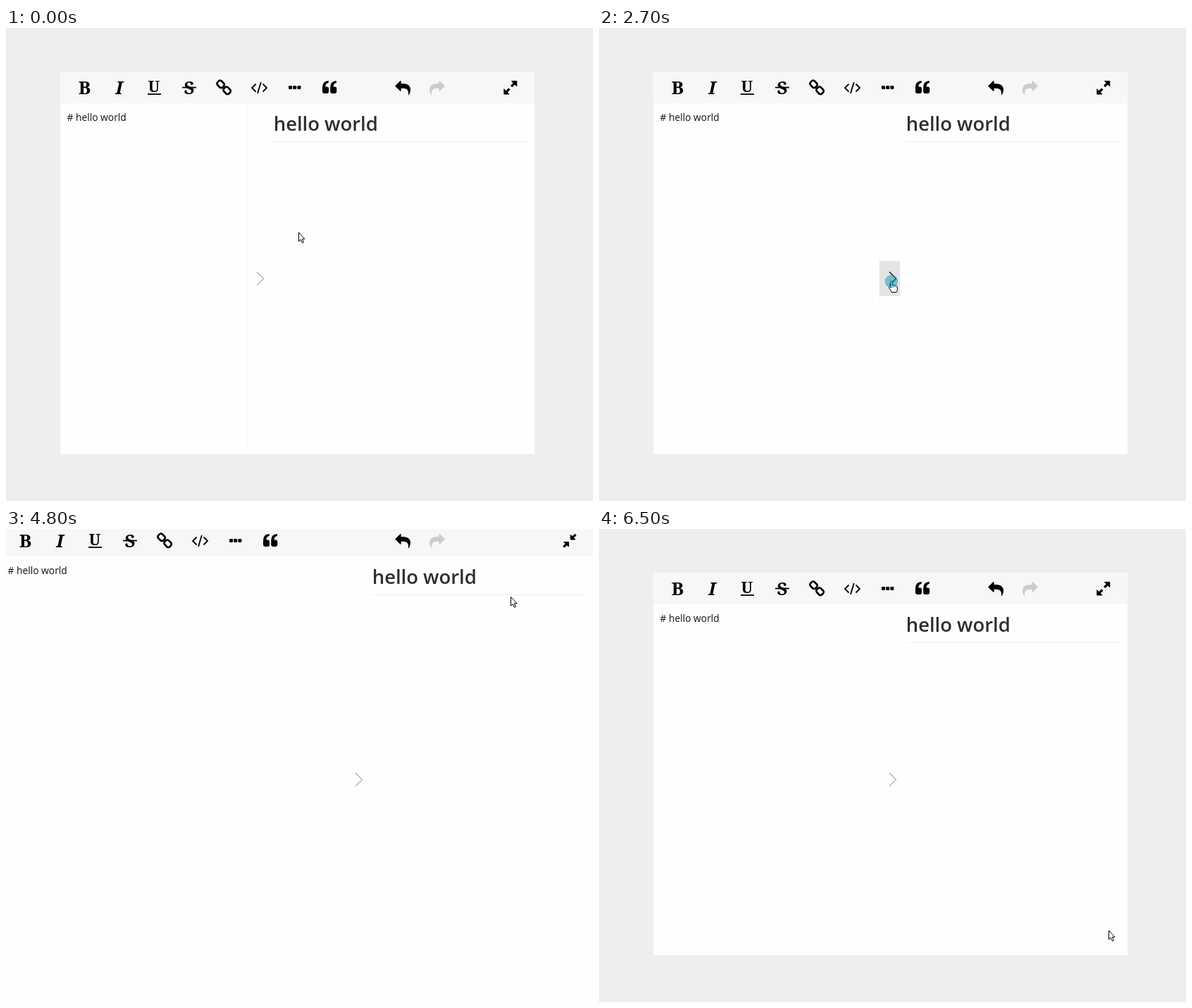
An HTML page for the animation above (7300 ms loop, 833 by 672 pixels).

```html
<!DOCTYPE html>
<html lang="en">
<head>
<meta charset="utf-8">
<title>Markdown editor</title>
<style>
  html, body { margin: 0; width: 100%; height: 100%; overflow: hidden; background: #eee; }
  svg { display: block; }
  text { font-family: "Open Sans", "Noto Sans", sans-serif; }
  .serif { font-family: "Noto Serif", "Liberation Serif", serif; font-weight: 700; text-anchor: middle; }
  .line { fill: none; stroke: #000; }
  .pointer { fill: #fff; stroke: #000; stroke-linejoin: round; }
</style>
</head>
<body>
<svg width="833" height="672" viewBox="0 0 833 672">
  <defs>
    <path id="back" d="M552 82.4L559.3 75.2Q560.6 74.3 560.6 76V79.1H563C571 79.1 574 83 574 88Q574 91 571.8 95Q571 95.6 571 94.5C571.4 88 569 85.8 563 85.8H560.6V88.8Q560.6 90.4 559.3 89.5Z"/>
    <path id="quote" d="M457.6 75V78Q453.4 78.6 453.3 83.6H455.6Q458 83.6 458 86V90.6Q458 93 455.6 93H451.4Q449 93 449 90.6V84Q449 75.4 457.6 75Z"/>
    <rect id="ring" x="-5" y="-4" width="10" height="8" rx="2.8"/>
    <g id="out">
      <path d="M9 -9.3V-2L1.7 -9.3Z" stroke="#000" stroke-linejoin="round"/>
      <path class="line" d="M6 -6.3L1.4 -1.7" stroke-width="3.2"/>
    </g>
    <g id="in">
      <path d="M1.4 -1.7V-8.4L8.1 -1.7Z" stroke="#000" stroke-linejoin="round"/>
      <path class="line" d="M4 -4.3L8.6 -8.9" stroke-width="3.2"/>
    </g>
  </defs>

  <rect id="panel" fill="#fefefe"/>
  <rect id="bar" fill="#f7f7f7"/>
  <rect id="hover" fill="#fefefe"/>

  <g id="left">
    <text class="serif" x="111.5" y="94" font-size="26">B</text>
    <text class="serif" x="160.5" y="94" font-size="26" font-style="italic">I</text>
    <text class="serif" x="210" y="90.5" font-size="22">U</text>
    <path class="line" d="M201 94H220" stroke-width="1.8"/>
    <text class="serif" x="260" y="94" font-size="26">S</text>
    <path class="line" d="M250 84.5H270" stroke-width="1.8"/>
    <g class="line" stroke-width="2.7">
      <use href="#ring" transform="translate(304.6 79.8) rotate(45)"/>
      <use href="#ring" transform="translate(313.6 88.8) rotate(45)"/>
    </g>
    <path class="line" d="M354.5 79.5L349 85L354.5 90.5M364.5 79.5L370 85L364.5 90.5M361.8 77L357 93" stroke-width="1.8"/>
    <rect x="401" y="82" width="5" height="5" rx="1.3"/>
    <rect x="407.2" y="82" width="5" height="5" rx="1.3"/>
    <rect x="413.4" y="82" width="5" height="5" rx="1.3"/>
    <use href="#quote"/>
    <use href="#quote" x="11.2"/>
    <text x="86.5" y="132.3" font-size="13.8" fill="#111">#&#160;hello world</text>
  </g>

  <g id="middle">
    <use href="#back"/>
    <use href="#back" transform="translate(1175) scale(-1 1)" fill="#ccc"/>
  </g>

  <g id="right">
    <g id="expand"><use href="#out"/><use href="#out" transform="rotate(180)"/></g>
    <g id="shrink"><use href="#in"/><use href="#in" transform="rotate(180)"/></g>
  </g>

  <g id="preview">
    <rect id="splitter" width="1" fill="#f8f8f8"/>
    <text id="title" font-size="27.4" font-weight="600" fill="#2d2d2d">hello world</text>
    <rect id="rule" height="1" fill="#eee"/>
  </g>
  <rect id="toggle" y="331" width="29" height="50" fill="#e4e4e4"/>
  <path id="chevron" fill="none" stroke-width="1.4"/>

  <g id="cursor">
    <path id="arrow" class="pointer" d="M.5 .5V13.2L3.3 10.6L5.4 15.4L7.4 14.5L5.4 9.8H9Z"/>
    <path id="hand" class="pointer" d="M-1 .5Q.3 -1.6 1.5 .5V5.5Q3.2 4.6 4 6Q5.8 5.4 6.4 7Q8.4 6.6 8.4 9V11.5Q8 13.5 7 15.5H.3Q-.8 12.6 -3.3 9.6Q-4 7.4 -2.5 7.6L-1 9Z"/>
    <path id="resize" d="M-7 .5L-4 -2.5V0H4V-2.5L7 .5L4 3.5V1H-4V3.5Z"/>
    <circle id="press" r="9.3" fill="#0896af" fill-opacity=".5"/>
  </g>
</svg>
<script>
const LOOP = 7300, STEP = 100;
const $ = id => document.getElementById(id);
const set = (id, attrs) => { for (const k in attrs) $(id).setAttribute(k, attrs[k]); };
const show = (id, on) => set(id, { display: on ? "inline" : "none" });
const move = (id, x, y) => set(id, { transform: `translate(${x} ${y})` });
const box = (id, x, y, width, height) => set(id, { x, y, width, height });

const POWER = 3.72;
const smooth = u => u < .5 ? (2 * u) ** POWER / 2 : 1 - (2 - 2 * u) ** POWER / 2;
const linear = u => u;

// Pointer legs: start, end, x, y, easing
const legs = [
  [0, 500, 357, 250, smooth],
  [600, 1100, 483, 255, smooth],
  [1200, 1700, 336, 260, smooth],
  [1800, 2100, 413, 262, smooth],
  [2200, 2500, 415, 360, smooth],
  [2700, 3000, 620, 364, smooth],
  [3000, 3300, 727, 366, linear],
  [3300, 3400, 732, 362, linear],
  [3600, 3700, 731, 341, linear],
  [3700, 4100, 717, 78, smooth],
  [4100, 4300, 715, 101, linear],
  [4300, 4500, 715, 97, linear],
  [4700, 5300, 806, 28, smooth],
  [5800, 6500, 723, 570, smooth]
];
const clicks = [700, 2700, 3600, 4700, 5800];

function pointerAt(t) {
  let x = 415, y = 290;
  for (const [from, to, nx, ny, ease] of legs) {
    if (t <= from) break;
    const u = ease(Math.min(1, (t - from) / (to - from)));
    x += (nx - x) * u;
    y += (ny - y) * u;
  }
  return { x: Math.round(x), y: Math.round(y) };
}

function draw(t) {
  const p = pointerAt(t);
  const full = t >= 4800 && t < 5900;
  const collapsed = t >= 2800 && t < 3700;
  const side = full ? 84 : 0, dy = full ? -68 : 0;
  const split = t <= 600 ? 342 : t <= 2100 ? p.x - 15 : 398 + side;
  const inside = (x, y, w, h) => p.x >= x && p.x < x + w && p.y >= y && p.y < y + h;

  if (full) box("panel", 0, 0, 833, 672);
  else box("panel", 77.3, 62, 672.7, 543.5);
  if (full) box("bar", 0, 0, 833, 39);
  else box("bar", 77.3, 62, 672.7, 45);

  const overFull = inside(691 + side, 62 + dy, 49, 45);
  box("hover", 691 + side, 62 + dy, 49, 45);
  show("hover", overFull);
  move("left", -side, dy);
  move("middle", 0, dy);
  move("right", 715.8 + side, 84.7 + dy);
  show("expand", !full);
  show("shrink", full);

  show("preview", !collapsed);
  set("splitter", { x: split, y: 107 + dy, height: full ? 633 : 498 });
  set("title", { x: split + 37.8, y: 146 + dy });
  box("rule", split + 38, 161 + dy, 740 + side - split - 38, 1);

  const toggleX = collapsed ? 720 : split;
  const overToggle = inside(toggleX, 331, 29, 50);
  set("toggle", { x: toggleX });
  show("toggle", overToggle);
  const tail = collapsed ? 736 : split + 14, tip = collapsed ? 726.5 : split + 23.5;
  set("chevron", {
    d: `M${tail} 346.5L${tip} 356L${tail} 365.5`,
    stroke: overToggle ? "#111" : "#b5b5b5"
  });

  const hand = overFull || overToggle;
  const resize = !hand && t < 2500 && inside(split, 107, 29, 498);
  move("cursor", p.x, p.y);
  show("hand", hand);
  show("resize", resize);
  show("arrow", !hand && !resize);
  show("press", clicks.includes(t));
}

const start = performance.now();
function tick() {
  const t = (performance.now() - start) % LOOP;
  draw(Math.floor(t / STEP) * STEP);
  requestAnimationFrame(tick);
}
tick();
</script>
</body>
</html>
```
